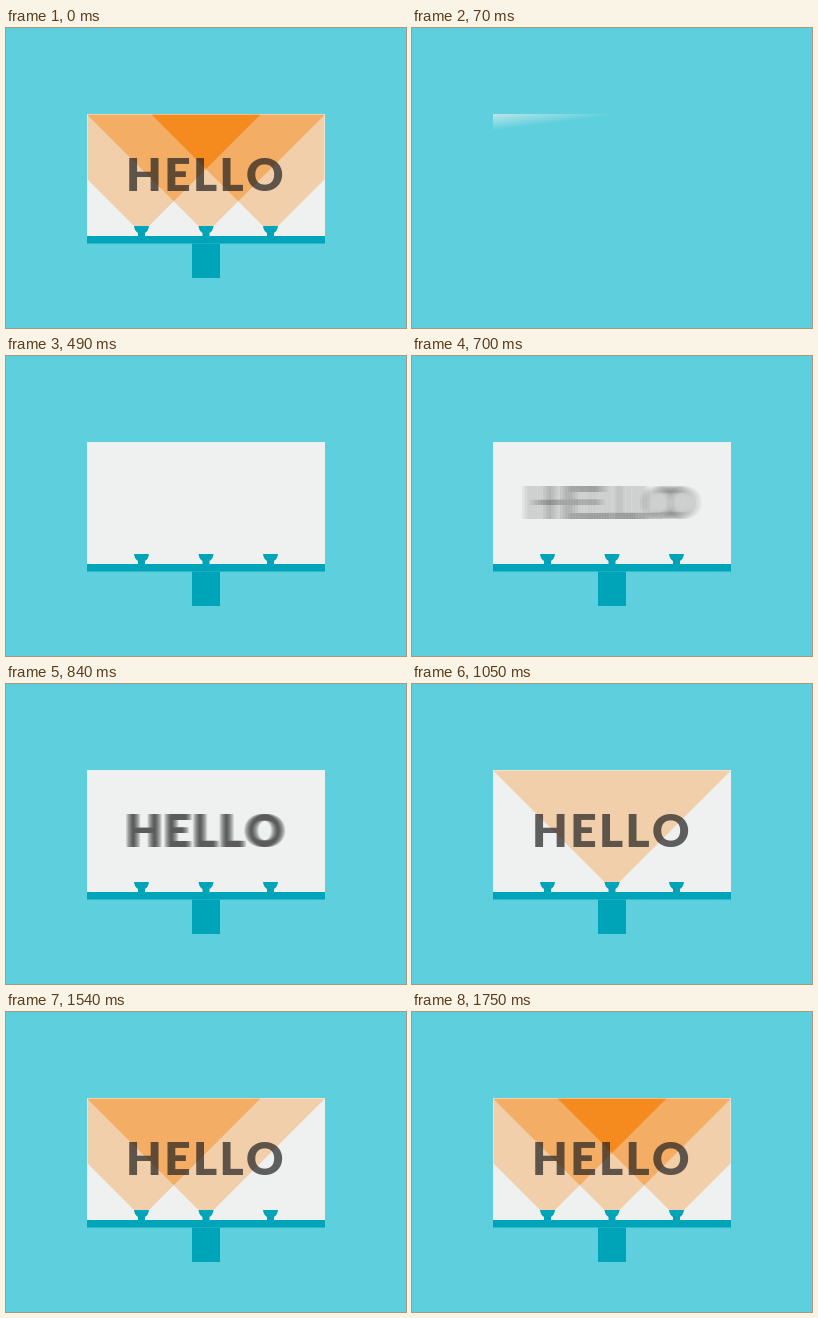
These frames come from a looping animation (400x300 px, 3150 ms). An HTML page with a canvas:

```html
<!DOCTYPE html>
<html lang="en">
<head>
<meta charset="utf-8">
<title>Billboard</title>
<style>
html, body { margin: 0; width: 100%; height: 100%; overflow: hidden; background: #5ecfdd; }
canvas { display: block; }
</style>
</head>
<body>
<canvas id="stage" width="400" height="300"></canvas>
<script>
const ctx = document.getElementById('stage').getContext('2d');
const LOOP = 3150, STEP = 70;
const TEAL = '#00a4b9';
const LAMPS = { left: 135.5, center: 200, right: 264.5 };
const clamp = v => Math.max(0, Math.min(1, v));

function fillPolygon(points, color) {
  ctx.fillStyle = color;
  ctx.beginPath();
  points.forEach(([x, y]) => ctx.lineTo(x, y));
  ctx.fill();
}

// The board is revealed downwards behind a soft, tilted edge.
function drawBoard(t) {
  const y = 171.5 + (t - 210) / STEP * 55;
  const edge = ctx.createLinearGradient(200, y, 203.3, y + 25.5);
  edge.addColorStop(0, 'rgb(239,241,241)');
  edge.addColorStop(1, 'rgba(239,241,241,0)');
  ctx.fillStyle = t < 350 ? edge : 'rgb(239,241,241)';
  ctx.fillRect(81, 86, 238, t < 350 ? 126 : 122);
}

// Each beam takes away the same amount of green and blue, so overlaps deepen evenly.
function drawBeam(x) {
  ctx.save();
  ctx.beginPath();
  ctx.rect(81.5, 86.5, 237, 112);
  ctx.clip();
  const beam = [[x - 7, 198.5], [x - 119.5, 86], [x + 119.5, 86], [x + 7, 198.5]];
  ctx.globalCompositeOperation = 'difference';
  fillPolygon(beam, 'rgb(0,34,70)');
  ctx.globalCompositeOperation = 'lighter';
  fillPolygon(beam, 'rgb(2,0,0)');
  ctx.restore();
}

// The word arrives with a sideways blur that narrows to nothing.
function drawWord(t) {
  const left = 123, width = 154;
  const blur = 21 * clamp((980 - t) / 350) ** 2;
  const copies = blur ? 11 : 1;
  const opacity = 0.7 * clamp((t - 560) / 210);
  ctx.font = '900 46px Lato, "Open Sans", sans-serif';
  ctx.fontKerning = 'none';
  ctx.letterSpacing = '0px';
  const ink = ctx.measureText('HELLO');
  const inkWidth = ink.actualBoundingBoxLeft + ink.actualBoundingBoxRight;
  ctx.letterSpacing = (width - inkWidth) / 4 + 'px';
  ctx.fillStyle = `rgba(33,31,32,${1 - (1 - opacity) ** (1 / copies)})`;
  for (let i = 0; i < copies; i++) {
    const shift = copies > 1 ? blur * (2 * i / (copies - 1) - 1) : 0;
    ctx.fillText('HELLO', left + ink.actualBoundingBoxLeft + shift, 163);
  }
}

function drawLamp(x) {
  ctx.fillStyle = TEAL;
  ctx.beginPath();
  ctx.moveTo(x - 7.5, 198);
  ctx.lineTo(x + 7.5, 198);
  ctx.quadraticCurveTo(x + 7, 203, x + 3.5, 205);
  ctx.lineTo(x + 3.5, 209);
  ctx.lineTo(x - 3.5, 209);
  ctx.lineTo(x - 3.5, 205);
  ctx.quadraticCurveTo(x - 7, 203, x - 7.5, 198);
  ctx.fill();
}

function drawStand(t) {
  ctx.globalAlpha = clamp((t - 280) / 210);
  ctx.fillStyle = TEAL;
  ctx.fillRect(81, 208, 238, 7.5);
  ctx.fillRect(186, 215.5, 28, 34.5);
  Object.values(LAMPS).forEach(drawLamp);
  ctx.globalAlpha = 1;
}

function draw(now) {
  let t = Math.floor(now % LOOP / STEP) * STEP;
  if (t < STEP) t += LOOP;   // the finished sign is held across the loop point

  ctx.fillStyle = '#5ecfdd';
  ctx.fillRect(0, 0, 400, 300);
  drawBoard(t);

  const rightFlickersOff = t === 1540 || t === 1680;
  if (t >= 1050) drawBeam(LAMPS.center);
  if (t >= 1190) drawBeam(LAMPS.left);
  if (t >= 1330 && !rightFlickersOff) drawBeam(LAMPS.right);

  if (t >= 630) drawWord(t);
  if (t > 280) drawStand(t);
}

function loop() {
  draw(performance.now());
  requestAnimationFrame(loop);
}
loop();
</script>
</body>
</html>
```
